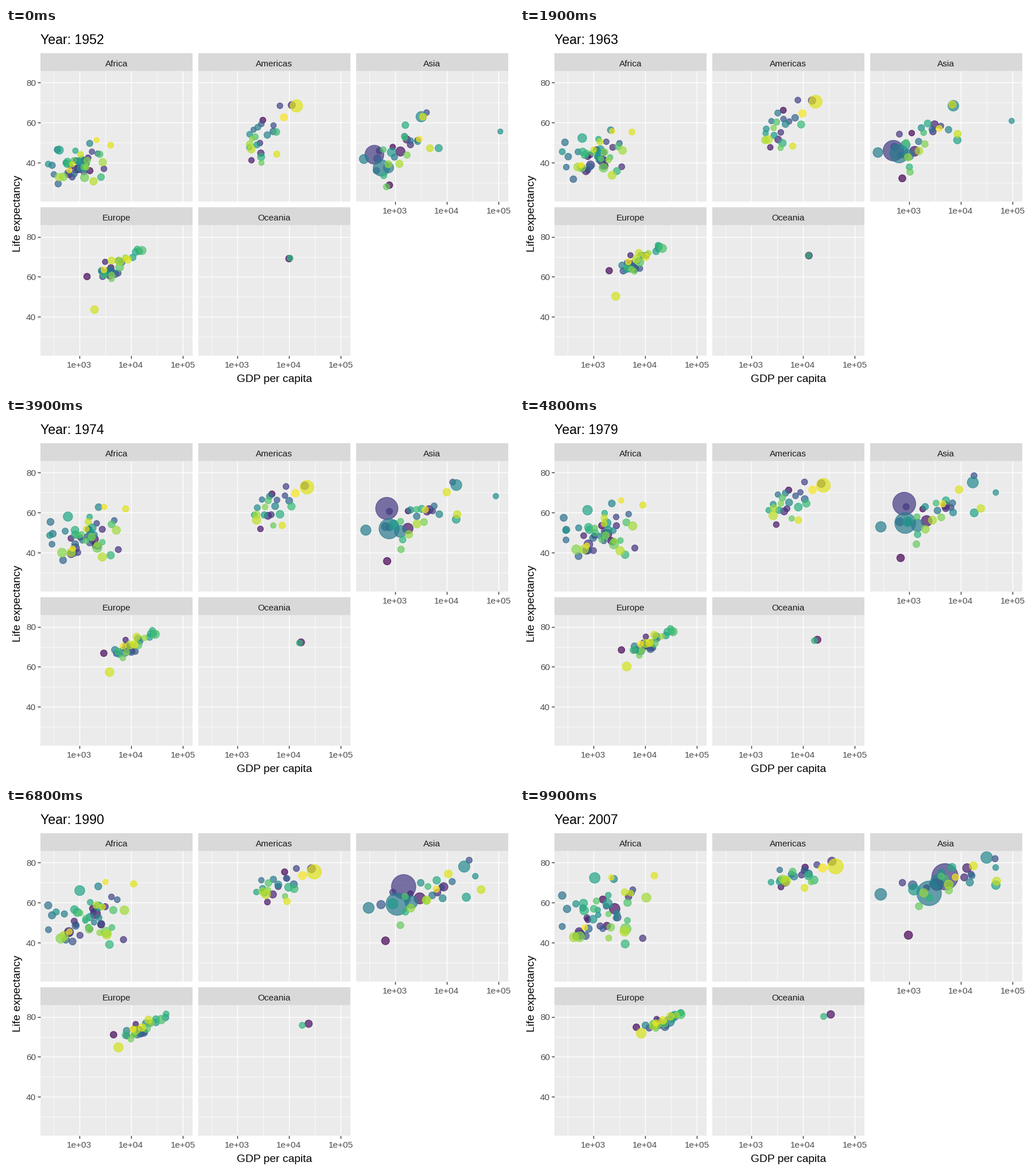
A matplotlib script that plays this animation: 885x632 px, repeating every 10 s.

```python
import matplotlib.pyplot as plt
import numpy as np
from matplotlib.animation import FuncAnimation
from matplotlib.patches import Rectangle

W, H, DPI = 885, 632, 100
FRAMES, INTERVAL = 100, 100
PT = 72 / DPI                                  # points per pixel
FIRST, LAST = 1952, 2007
PANEL_W, PANEL_H, STRIP_H = 265.2, 227.6, 31.4
DECADE, LIFE_PX = 90.2, 3.493
LOG_MIN, LIFE_MAX = 2.248, 85.553
MAX_POP = 1319                                 # millions

plt.rcParams["font.family"] = "Liberation Sans"
fig = plt.figure(figsize=(W / DPI, H / DPI), dpi=DPI, facecolor="white")
ax = fig.add_axes([0, 0, 1, 1])
ax.set(xlim=(0, W), ylim=(H, 0))
ax.axis("off")

time = np.linspace(FIRST, LAST, FRAMES)
surveys = np.arange(FIRST, LAST + 1, 5)
rng = np.random.default_rng(7)
tracks = []


def box(x, y, w, h, color):
    ax.add_patch(Rectangle((x, y), w, h, fc=color, lw=0, zorder=1))


def line(xs, ys, color="white", width=1.4):
    ax.plot(xs, ys, color=color, lw=width * PT, solid_capstyle="butt", zorder=2)


def label(x, y, s, px, color="black", ha="center", **kw):
    return ax.text(x, y, s, size=px * PT, color=color, ha=ha, va="baseline", **kw)


def curve(stops):
    """Spread a few values evenly over the whole period."""
    years = np.linspace(FIRST, LAST, len(stops))
    return np.interp(surveys, years, stops)[:, None]


def wander(n):
    """Standard scores of n countries, drifting a little at each survey."""
    z = rng.normal(size=n) + 0.15 * rng.normal(size=(len(surveys), n)).cumsum(axis=0)
    z = (z - z.mean(axis=1, keepdims=True)) / z.std(axis=1, keepdims=True)
    return z.clip(-2.2, 2.2)


class Facet:
    def __init__(self, name, col, row):
        self.left, self.top = 59.8 + 275 * col, 75.2 + 269.1 * row
        left, top = self.left, self.top
        right, bottom = left + PANEL_W, top + PANEL_H
        box(left, top - STRIP_H, PANEL_W, STRIP_H, "#D9D9D9")
        box(left, top, PANEL_W, PANEL_H, "#EBEBEB")
        label((left + right) / 2, top - 8.4, name, 15.4, "#1A1A1A")

        for v in (2.5, 3.5, 4.5):
            line([self.x(v)] * 2, [top, bottom], width=0.7)
        for v in (30, 50, 70):
            line([left, right], [self.y(v)] * 2, width=0.7)
        for v in (3, 4, 5):
            x = self.x(v)
            line([x, x], [top, bottom])
            if row or col == 2:
                line([x, x], [bottom, bottom + 4.8], "#333333")
                label(x, bottom + 21.3, f"1e+0{v}", 15.4, "#4D4D4D")
        for v in (40, 60, 80):
            y = self.y(v)
            line([left, right], [y, y])
            if col == 0:
                line([left - 4.8, left], [y, y], "#333333")
                label(left - 7.7, y + 5.7, v, 15.4, "#4D4D4D", "right")

    def x(self, log_gdp):
        return self.left + (log_gdp - LOG_MIN) * DECADE

    def y(self, life):
        return self.top + 0.9 + (LIFE_MAX - life) * LIFE_PX

    def track(self, shade, pop0, pop1, years, log_gdp, life):
        x = self.x(np.interp(time, years, log_gdp))
        y = self.y(np.interp(time, years, life))
        pop = np.linspace(pop0, pop1, FRAMES)
        diameter = 3.73 * (2 + 10 * np.sqrt(pop / MAX_POP)) + 1.25
        tracks.append((shade, x, y, (diameter * PT) ** 2))

    def lead(self, shade, pop0, pop1, *points):
        """One prominent country through (year, GDP, life expectancy) points."""
        years, gdp, life = zip(*points)
        self.track(shade, pop0, pop1, years, np.log10(gdp), life)

    def crowd(self, n, pop, growth, link, log_gdp, gdp_sd, life, life_sd):
        """n countries scattered around a moving centre; link ties life to GDP."""
        zx = wander(n)
        zy = link * zx + np.sqrt(1 - link ** 2) * wander(n)
        gx = (curve(log_gdp) + curve(gdp_sd) * zx).clip(2.4, 4.69)
        ly = (curve(life) + curve(life_sd) * zy).clip(28, 82)
        pops = pop * np.exp(1.1 * rng.normal(size=n)).clip(0.03, 9)
        for i, shade in enumerate(np.linspace(0.01, 0.99, n)):
            self.track(shade, pops[i], pops[i] * growth, surveys, gx[:, i], ly[:, i])


africa = Facet("Africa", 0, 0)
africa.crowd(52, 3.5, 2.9, 0.4, (2.99, 3.17, 3.19), (0.28, 0.45), (39.1, 50.5, 54.8), (5.2, 9.4))

americas = Facet("Americas", 1, 0)
americas.crowd(23, 3.5, 2.4, 0.6, (3.48, 3.73, 3.87), (0.2, 0.27), (52.2, 65, 73), (8.8, 4))
americas.lead(0.14, 14.8, 33.4, (1952, 11367, 68.8), (1977, 22091, 74.2), (2007, 36319, 80.7))
americas.lead(0.95, 157.6, 301, (1952, 13990, 68.4), (1977, 24073, 73.4), (2007, 42952, 78.2))

asia = Facet("Asia", 2, 0)
asia.crowd(27, 9, 2.6, 0.7, (3.12, 3.5, 3.73), (0.36, 0.58), (47, 60.5, 70.5), (9, 6))
asia.lead(0, 8.4, 31.9, (1952, 779, 28.8), (1992, 649, 41.7), (2007, 975, 43.8))
asia.lead(0.17, 556, 1319, (1952, 400, 44), (1957, 576, 50.5), (1962, 488, 44.5),
          (1967, 613, 58.4), (1977, 741, 64), (1992, 1656, 68.7), (2007, 4959, 73))
asia.lead(0.41, 372, 1110, (1952, 547, 37.4), (1977, 813, 54.2), (1992, 1164, 60.2), (2007, 2452, 64.7))
asia.lead(0.42, 82, 224, (1952, 750, 37.5), (1977, 1383, 52.7), (2007, 3541, 70.6))
asia.lead(0.47, 86.5, 127.5, (1952, 3217, 63), (1972, 14779, 73.4), (2007, 31656, 82.6))
asia.lead(0.5, 0.16, 2.5, (1952, 108382, 55.6), (1962, 95458, 60.5), (1972, 109348, 67.7),
          (1982, 31354, 71.3), (2007, 47307, 77.6))

europe = Facet("Europe", 0, 1)
europe.crowd(29, 8, 1.25, 0.85, (3.7, 4.1, 4.36), (0.25, 0.24), (65.3, 72.3, 77.7), (4.6, 2.5))
europe.lead(0.93, 22.2, 71, (1952, 1969, 43.6), (1977, 4269, 59.5), (2007, 8458, 71.8))

oceania = Facet("Oceania", 1, 1)
oceania.lead(0.035, 8.7, 20.4, (1952, 10040, 69.1), (1974, 17300, 72.3), (2007, 34435, 81.2))
oceania.lead(0.645, 2, 4.1, (1952, 10557, 69.4), (1974, 16100, 72), (1992, 18363, 76.3), (2007, 25185, 80.2))

label(467.4, 617.7, "GDP per capita", 19.25)
label(25.3, 324, "Life expectancy", 19.25, rotation=90, rotation_mode="anchor")
title = label(59.8, 28.4, "", 23.1, ha="left")

tracks.sort(key=lambda t: t[0])
shades, xs, ys, areas = (np.array(part) for part in zip(*tracks))
colors = plt.cm.viridis(shades, alpha=0.7)
dots = ax.scatter(xs[:, 0], ys[:, 0], s=areas[:, 0], c=colors, edgecolors=colors,
                  linewidths=1.2 * PT, zorder=3)


def update(k):
    title.set_text(f"Year: {round(time[k])}")
    dots.set_offsets(np.column_stack([xs[:, k], ys[:, k]]))
    dots.set_sizes(areas[:, k])
    return title, dots


anim = FuncAnimation(fig, update, frames=FRAMES, interval=INTERVAL, repeat=True)
plt.show()
```
